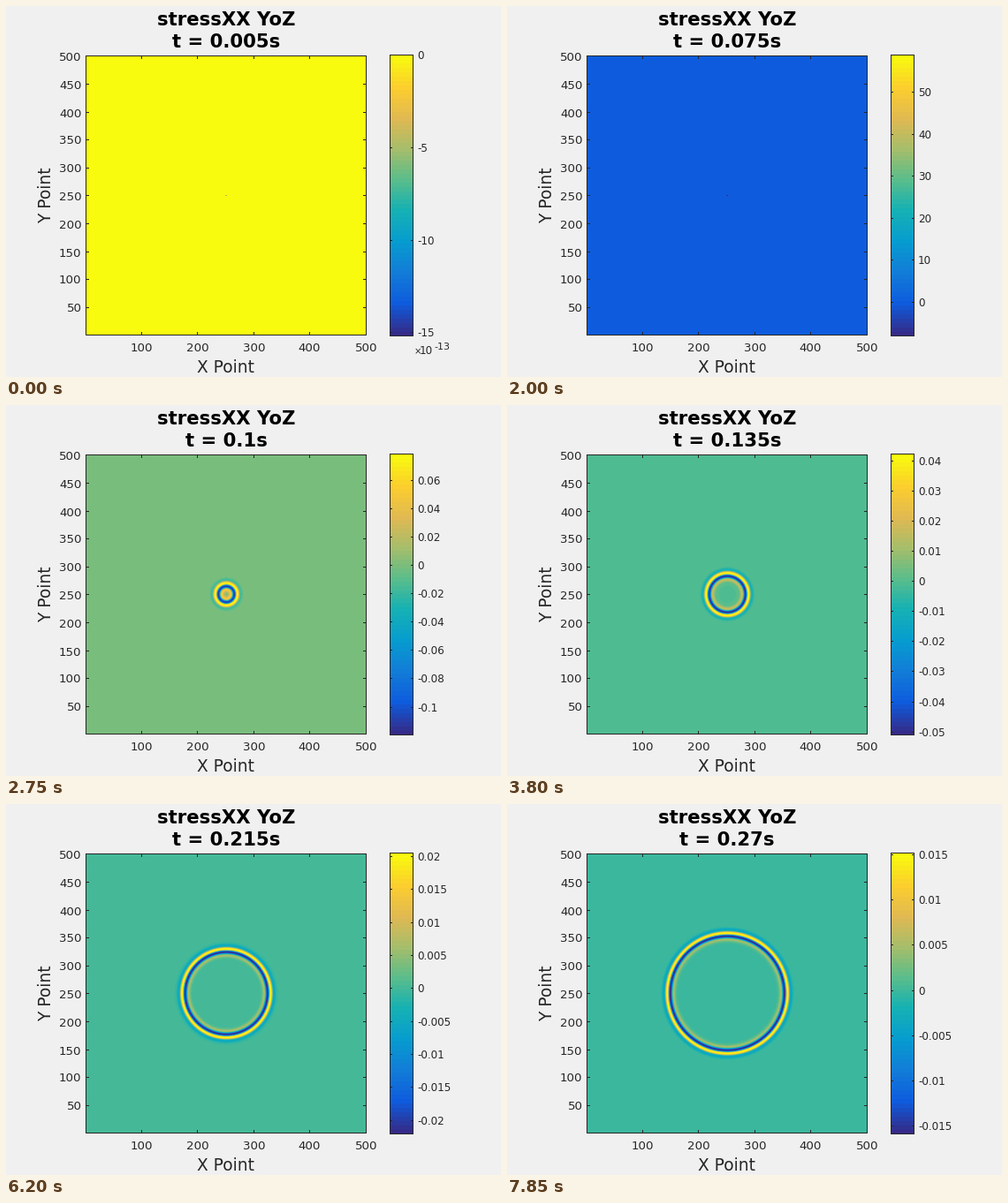
These frames come from a looping animation (560x420 px, 8 s). A matplotlib script:

```python
import math

import numpy as np
import matplotlib.pyplot as plt
from matplotlib.animation import FuncAnimation
from matplotlib.colors import LinearSegmentedColormap

W, H, DPI = 560, 420, 100
INK = (0.15, 0.15, 0.15)
PX = 72 / DPI                       # points per pixel
LEFT, RIGHT, TOP, BOTTOM = 90, 408, 56, 373
BAR_L, BAR_R, BAR_T, BAR_B = 434, 461, 55, 374
CX, CY = 249.3, 214.2               # source position in pixels

SPEED = 326                         # wave speed, pixels per second
DELAY, WIDTH = 0.0665, 0.01056      # pulse centre and width, seconds
STEP_MS, TICK_MS = 150, 50
FRAMES = 8000 // TICK_MS

CMAP = LinearSegmentedColormap.from_list("blue_yellow", [
    "#352a87", "#0f5cdd", "#127dd8", "#079ccf", "#15b1b4",
    "#59bd8c", "#a5be6b", "#e1b952", "#fcce2e", "#f9fb0e"], N=64)

px, py = np.meshgrid(np.arange(LEFT, RIGHT) + 0.5, np.arange(TOP, BOTTOM) + 0.5)
RADIUS = np.hypot(px - CX, py - CY)


def source(t):
    """Stress at the source point."""
    x = (t - DELAY) / WIDTH
    return 140 * x * math.exp(-x * x)


def limits(t):
    """Colour range: the source rules first, then the spreading wave."""
    s = source(t)
    if s < 0:
        return s, 0.0
    lo, hi = -0.137 * s, s
    if t > 0.0745:
        lo = min(lo, -0.00311 / (t - 0.074))
        hi = max(hi, 0.0032 / (t - 0.0593))
    return lo, hi


def field(t):
    """Spherical wave with a third-derivative Gaussian pulse."""
    s = source(t)
    if s < 0:
        data = np.zeros_like(RADIUS)
    else:
        x = (t - DELAY - RADIUS / SPEED) / WIDTH
        data = 2.12 * (x**3 - 1.5 * x) * np.exp(-x * x) / np.hypot(RADIUS, 2)
    if t < 0.0975:
        row, col = int(CY) - TOP, int(CX) - LEFT
        data[row, col - 1:col + 1] = 0.3 * s if s < 0 else -0.137 * s
    return data


def bar_ticks(lo, hi):
    """Tick values and the shared power of ten (0 when none is shown)."""
    span = hi - lo
    small = max(-lo, hi) < 1e-3
    base = 10 ** math.floor(math.log10(span))
    choices = (0.5, 1) if small else (0.1, 0.2, 0.5, 1)
    step = next(c for c in choices if span / (c * base) <= 10) * base
    first, last = math.ceil(lo / step - 1e-9), math.floor(hi / step + 1e-9)
    power = math.floor(math.log10(step) + 1e-9) if small else 0
    return [k * step for k in range(first, last + 1)], power


fig = plt.figure(figsize=(W / DPI, H / DPI), dpi=DPI, facecolor="#f0f0f0")
ax = fig.add_axes([0, 0, 1, 1])
plt.rcParams["font.family"] = "DejaVu Sans"


def text(x, y, s="", size=13.33, ha="left", color=INK, **kw):
    return ax.text(x, y, s, fontsize=size * PX, ha=ha, va="baseline",
                   color=color, **kw)


def line(xs, ys):
    return ax.plot(xs, ys, color=INK, lw=PX, snap=False, zorder=3,
                   solid_capstyle="butt", solid_joinstyle="miter")[0]


def middle(v):
    """Centre of the pixel that holds v."""
    return math.floor(v) + 0.5


def frame(l, r, t, b):
    l, r, t, b = l + 0.5, r - 0.5, t + 0.5, b - 0.5
    line([l, r, r, l, l, r], [t, t, b, b, t, t])


wave = ax.imshow(field(0.005), cmap=CMAP, aspect="auto", interpolation="nearest",
                 extent=(LEFT, RIGHT, BOTTOM, TOP))
ax.imshow(np.arange(64)[::-1, None], cmap=CMAP, aspect="auto",
          interpolation="nearest", extent=(BAR_L, BAR_R, BAR_B, BAR_T))
ax.set_xlim(0, W)
ax.set_ylim(H, 0)
ax.axis("off")
frame(LEFT, RIGHT, TOP, BOTTOM)
frame(BAR_L, BAR_R, BAR_T, BAR_B)

for v in range(100, 501, 100):
    x = middle(90.5 + (v - 0.5) * 0.634)
    line([x, x], [BOTTOM, BOTTOM - 4])
    line([x, x], [TOP, TOP + 4])
    text(x, 391, str(v), ha="center")
for v in range(50, 501, 50):
    y = middle(372.5 - (v - 0.5) * 0.632)
    line([LEFT, LEFT + 4], [y, y])
    line([RIGHT - 4, RIGHT], [y, y])
    text(85.5, y + 5, str(v), ha="right")

text(249, 415, "X Point", 18.67, "center")
text(51, 214.5, "Y Point", 18.67, "center", rotation=90, rotation_mode="anchor")
bold = dict(size=21.33, ha="center", color="black", weight="bold")
text(249, 22, "stressXX YoZ", **bold)
clock = text(249, 47, **bold)

bar_labels = [text(465, 0, size=12) for _ in range(13)]
bar_marks = line([], [])
power_parts = [text(461.5, 394, size=10), text(468, 394, size=12),
               text(484, 389, size=11)]


def update(i):
    per_step = STEP_MS // TICK_MS
    t = 0.005 * ((i + per_step - 1) // per_step + 1)
    lo, hi = limits(t)
    wave.set_data(field(t))
    wave.set_clim(lo, hi)
    clock.set_text(f"t = {t:.4g}s")

    ticks, power = bar_ticks(lo, hi)
    xs, ys = [], []
    for label in bar_labels:
        label.set_text("")
    for v, label in zip(ticks, bar_labels):
        y = 373.5 - (v - lo) / (hi - lo) * 318
        label.set_text(f"{v / 10.0**power + 0.0:.4g}")
        label.set_y(y + 4.5)
        xs += [BAR_L, BAR_L + 3, np.nan, BAR_R - 3, BAR_R, np.nan]
        ys += [middle(y)] * 6
    bar_marks.set_data(xs, ys)
    for part, s in zip(power_parts, ("×", "10", str(power))):
        part.set_text(s if power else "")
    return []


anim = FuncAnimation(fig, update, frames=FRAMES, interval=TICK_MS,
                     repeat=True, repeat_delay=0, blit=False)
plt.show()
```
